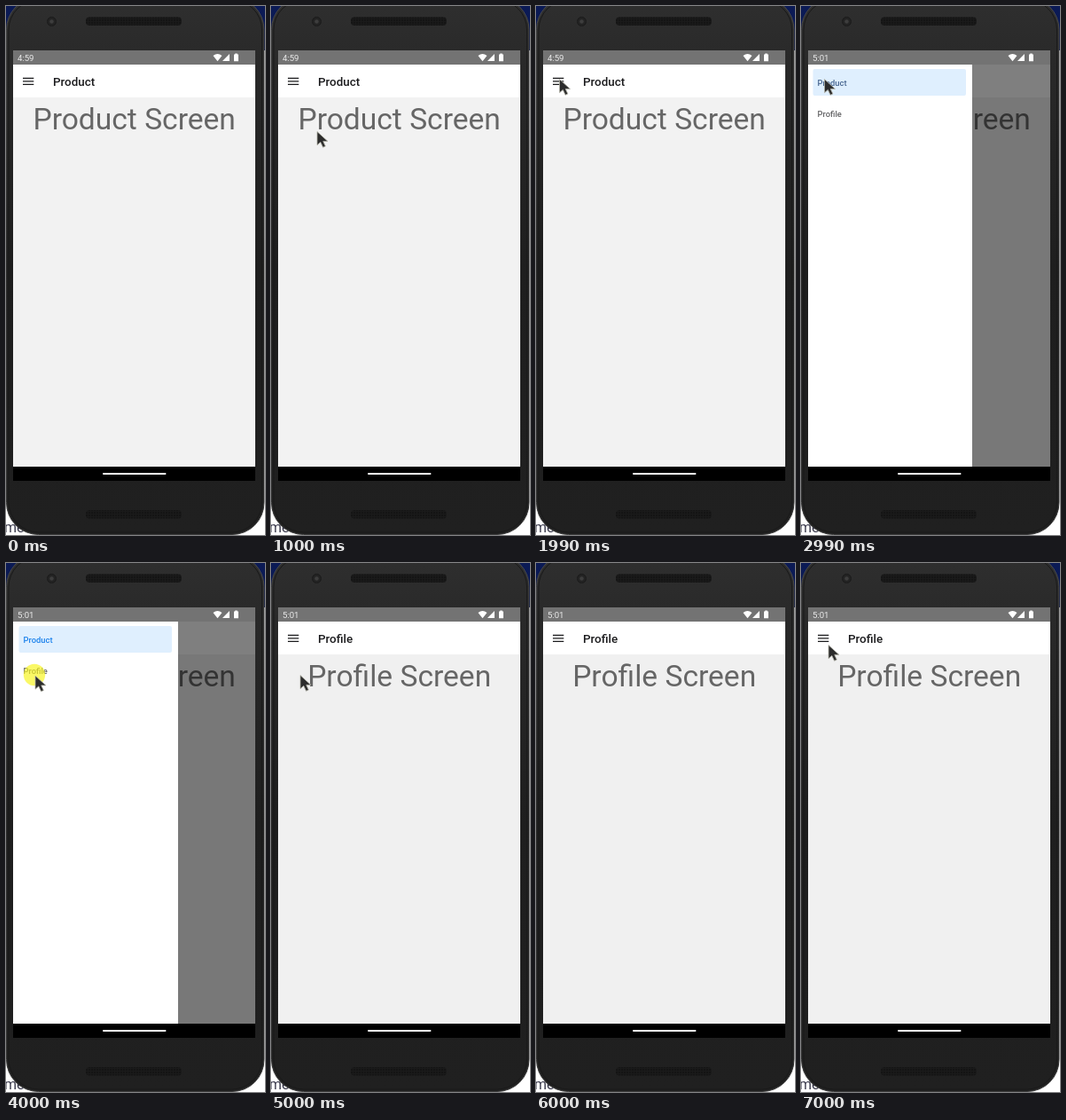
Write an HTML page that moves like this. It is 292 px wide and 596 px high and loops after 8 s.

```html
<!DOCTYPE html>
<html lang="en">
<head>
<meta charset="utf-8">
<title>Drawer navigation</title>
<style>
  html, body { margin: 0; width: 100%; height: 100%; overflow: hidden; background: #fff; }
  svg { display: block; width: 292px; height: 596px; font-family: Roboto, sans-serif; }
  .head { font-size: 13.4px; font-weight: 500; fill: #1c1c1e; }
  .title { font-size: 33.6px; fill: #666; text-anchor: middle; }
  .item { font-size: 9.35px; font-weight: 500; }
</style>
</head>
<body>
<svg viewBox="0 0 292 596">
  <defs>
    <linearGradient id="body" x2="0" y2="1">
      <stop offset="0" stop-color="#2f2f2f"/>
      <stop offset=".12" stop-color="#292929"/>
      <stop offset=".5" stop-color="#1e1e1e"/>
      <stop offset="1" stop-color="#202020"/>
    </linearGradient>
    <linearGradient id="rim" x2="0" y2="1">
      <stop offset="0" stop-color="#4a4a4a"/>
      <stop offset=".5" stop-color="#303030"/>
      <stop offset="1" stop-color="#3c3c3c"/>
    </linearGradient>
    <pattern id="mesh" width="3" height="3" patternUnits="userSpaceOnUse">
      <rect width="3" height="3" fill="#1a1a1a"/>
      <circle cx="1" cy="1" r=".8" fill="#0c0c0c"/>
    </pattern>
  </defs>

  <!-- desktop behind the phone -->
  <rect width="292" height="596" fill="#fff"/>
  <rect width="292" height="50" fill="#0b1a55"/>
  <text x="-2" y="593" font-size="16" fill="#3a3a4c">me</text>

  <!-- phone -->
  <rect x=".5" y="-9.5" width="290.5" height="605" rx="36" fill="url(#body)" stroke="url(#rim)"/>
  <rect x="3" y="-7" width="285.5" height="600" rx="34" fill="none" stroke="#191919"/>
  <rect x="90" y="12.5" width="108" height="9.5" rx="4" fill="url(#mesh)"/>
  <rect x="90" y="568" width="108" height="9.5" rx="4" fill="url(#mesh)"/>
  <circle cx="51.5" cy="17.5" r="5" fill="#232323" stroke="#1b1b1b"/>
  <circle cx="51.5" cy="17.5" r="2.3" fill="#3d3d3d"/>

  <!-- status bar -->
  <rect x="8" y="50" width="273" height="16" fill="#737373"/>
  <text id="clock" x="13" y="61.7" font-size="9.6" fill="#ececec"></text>
  <g fill="#fff">
    <path d="M233.5 56Q238.5 52 243.5 56L238.5 62.3Z"/>
    <path d="M244 62L252 54V62Z"/>
    <path d="M257 54.5H258.3V53.5H260.7V54.5H262V62.3H257Z"/>
  </g>

  <!-- app screen -->
  <rect id="page" x="8" y="66" width="273" height="453"/>
  <rect x="8" y="66" width="273" height="37" fill="#fff"/>
  <path d="M19 81.3H31.3M19 84.8H31.3M19 88.3H31.3" stroke="#1c1c1e" stroke-width="1.2"/>
  <text id="head" class="head" x="53" y="90"></text>
  <text id="title" class="title" x="144.7" y="139"></text>

  <!-- drawer -->
  <g id="drawer">
    <rect x="8" y="66" width="273" height="453" fill="#000" opacity=".5"/>
    <rect id="sheet" x="8" y="66" height="453" fill="#fff"/>
    <g id="items">
      <rect x="14.5" y="71" width="172.5" height="30" rx="2" fill="#dfeffe"/>
      <text id="active" class="item" x="19.6" y="90">Product</text>
      <text class="item" x="19.6" y="125.2" fill="#626264">Profile</text>
    </g>
  </g>

  <!-- system navigation -->
  <rect x="8" y="519" width="273" height="16" fill="#000"/>
  <rect x="109" y="526" width="71.5" height="2" rx="1" fill="#fff"/>

  <!-- pointer -->
  <circle id="click" cx="32" cy="126" r="12.2" fill="#f8f51e" opacity=".68"/>
  <path id="pointer" d="M0 0V15.2L3.8 11.9L6.6 17.8L9.4 16.5L6.8 10.9H12Z"
        fill="#2c2c2c" stroke="#b9b9ae" stroke-width=".8" stroke-linejoin="round"/>
</svg>
<script>
const LOOP = 8000;
// at: start in ms; drawer: edge position; pointer: tip position
const steps = [
  { at: 0, screen: 'Product', clock: '4:59' },
  { at: 1000, screen: 'Product', clock: '4:59', pointer: [52, 141.5] },
  { at: 1990, screen: 'Product', clock: '4:59', pointer: [26.5, 82.5] },
  { at: 2990, screen: 'Product', clock: '5:01', pointer: [26.5, 82.5], drawer: 193, tint: '#47658f' },
  { at: 4000, screen: 'Product', clock: '5:01', pointer: [33, 127], drawer: 194, tint: '#1c82ec', click: true },
  { at: 5000, screen: 'Profile', clock: '5:01', pointer: [33, 126.5] },
  { at: 6000, screen: 'Profile', clock: '5:01' },
  { at: 7000, screen: 'Profile', clock: '5:01', pointer: [31, 92.5] }
];

const $ = id => document.getElementById(id);
const show = (id, on) => $(id).setAttribute('visibility', on ? 'visible' : 'hidden');
const move = (id, x, y) => $(id).setAttribute('transform', `translate(${x} ${y})`);

function render({ screen, clock, pointer, drawer, tint, click }) {
  $('clock').textContent = clock;
  $('head').textContent = screen;
  $('title').textContent = screen + ' Screen';
  $('page').setAttribute('fill', screen === 'Product' ? '#f2f2f2' : '#f0f0f0');
  show('drawer', drawer);
  if (drawer) {
    $('sheet').setAttribute('width', drawer - 8);
    $('active').setAttribute('fill', tint);
    move('items', drawer - 194, 0);
  }
  show('click', click);
  show('pointer', pointer);
  if (pointer) move('pointer', ...pointer);
}

const start = performance.now();
let current;
function tick(now) {
  const t = Math.max(0, now - start) % LOOP;
  const step = steps.findLast(s => s.at <= t);
  if (step !== current) render(current = step);
  requestAnimationFrame(tick);
}
tick(start);
</script>
</body>
</html>
```
